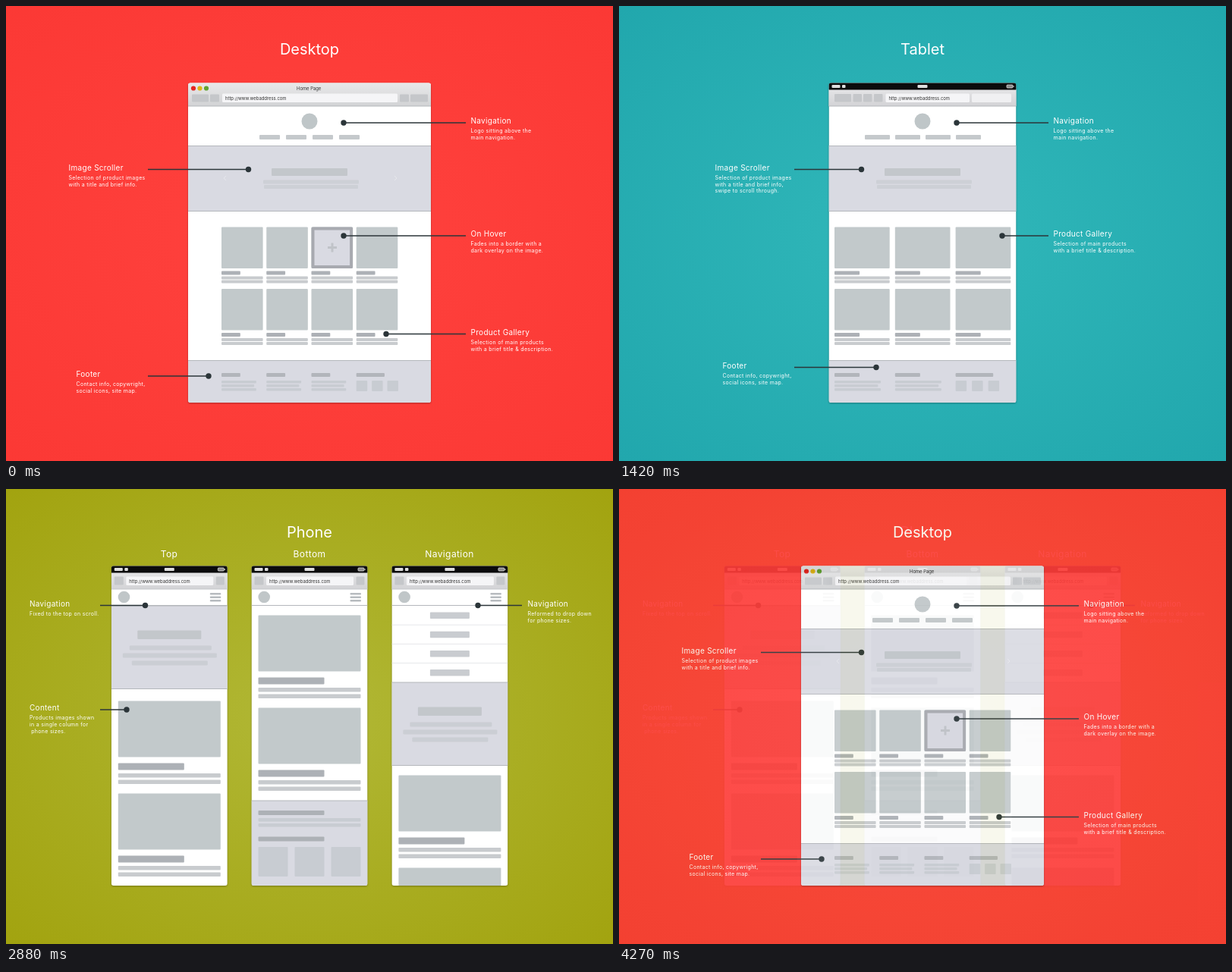
An HTML page that plays this animation: 800x600 px, repeating every 4.3 s.

```html
<!DOCTYPE html>
<html lang="en">
<head>
<meta charset="utf-8">
<title>Responsive wireframes</title>
<style>
  html, body { margin: 0; width: 100%; height: 100%; overflow: hidden; }
  svg { display: block; width: 800px; height: 600px; }
  text { font-family: Inter, "Open Sans", sans-serif; fill: #fff; white-space: pre; }
  .title { font-size: 20px; text-anchor: middle; }
  .sub { font-size: 12px; letter-spacing: .4px; text-anchor: middle; }
  .label { font-size: 10px; letter-spacing: .3px; }
  .body { font-size: 7px; letter-spacing: .3px; }
  .chrome { font-size: 5.9px; fill: #333; }
  .window { filter: drop-shadow(0 1px 1px rgba(0, 0, 0, .3)); }
</style>
</head>
<body>
<svg id="stage" viewBox="0 0 800 600"></svg>
<script>
const LOOP = 4300, STEP = 30, STEPS = 13;
const TILE = '#c2c9cb', CAPTION = '#adb1b6', LINE = '#c8cbce', PANEL = '#d9dae2',
      SOFT = '#c8ccd2', BUTTON = '#c5c7ca', EDGE = '#b4b7bc', INK = '#2b3539';

const range = n => [...Array(n).keys()];
const each = (n, fn) => range(n).map(fn).join('');
const rect = (x, y, w, h, fill, r = 0) =>
  `<rect x="${x}" y="${y}" width="${w}" height="${h}" rx="${r}" fill="${fill}"/>`;
const bar = (x, y, w, h, fill) => rect(x, y, w, h, fill, 1);
const circle = (x, y, r, fill) => `<circle cx="${x}" cy="${y}" r="${r}" fill="${fill}"/>`;
const text = (cls, x, y, str) =>
  `<text class="${cls}" x="${x}" y="${y}">${str.replace('&', '&amp;')}</text>`;
const stroke = (d, color, w) =>
  `<path d="${d}" fill="none" stroke="${color}" stroke-width="${w}"/>`;

// Rounded window that clips its content
let windows = 0;
function frame(x, w, content) {
  const id = 'w' + windows++;
  return `<clipPath id="${id}">${rect(x, 101.5, w, 421.5, '#000', 3)}</clipPath>
    <g class="window"><g clip-path="url(#${id})">${rect(x, 101, w, 423, '#fff')}${content}</g></g>`;
}

const panel = (x, y, w, h) =>
  rect(x, y, w, h, PANEL) + rect(x, y - .5, w, 1, EDGE);

function note(x, y, dotX, endX, label, ...lines) {
  return stroke(`M${dotX} ${y}H${endX}`, INK, 1.6) + circle(dotX, y, 3.7, INK) +
    text('label', x, y + 1, label) +
    lines.map((s, i) => text('body', x, y + 13.3 + i * 8.8, s)).join('');
}

function statusBar(x, w) {
  const right = x + w;
  return rect(x, 101, w, 9.5, '#0b0b0c') +
    bar(x + 4, 104, 11, 4, '#ddd') + bar(x + 17.5, 104, 4.5, 4, '#ddd') +
    bar(x + w / 2 - 6.5, 104, 13, 4, '#ddd') +
    `<rect x="${right - 12.5}" y="104" width="8" height="4" rx="1" fill="#888" stroke="#ddd" stroke-width=".8"/>` +
    rect(right - 4, 105.2, 1, 1.8, '#ddd');
}

const address = (x, w) =>
  rect(x, 115.5, w, 11.5, '#f5f5f7', 1.5) + text('chrome', x + 4, 123.6, 'http://www.webaddress.com');

// Shared desktop and tablet page
function page(x, w, cols, tileW, navW, navX, navPitch, iconPitch) {
  const pitch = (232.3 - tileW) / (cols - 1), head = tileW * .455;
  const col = i => 284 + i * pitch;
  const row = y => each(cols, i =>
    bar(col(i), y, tileW, 54.5, TILE) +
    bar(col(i), y + 58, head, 5, CAPTION) +
    bar(col(i), y + 65, tileW, 4, LINE) +
    bar(col(i), y + 70, tileW, 4, LINE));
  return rect(x, 131.5, w, 1, EDGE) + circle(400, 152, 10.5, '#bfc6c8') +
    each(4, i => bar(navX + i * navPitch, 170, navW, 6, '#c5c9cc')) +
    panel(x, 184.5, w, 86) + rect(x, 270, w, 1, EDGE) +
    bar(350, 214, 100, 10, '#c3c7cb') +
    bar(339, 229.5, 126, 5, '#cdd0d6') + bar(340, 236, 124, 5, '#cdd0d6') +
    row(291.5) + row(373) +
    panel(x, 467.5, w, 56) +
    each(cols, i => bar(col(i), 484, i < cols - 1 ? head : head * 1.5, 5, '#b2b5bb')) +
    each(cols - 1, i => each(3, j =>
      bar(col(i), 494 + j * 5, tileW * (j == 1 ? .79 : .84), 3.5, SOFT))) +
    each(3, i => bar(col(cols - 1) + i * iconPitch, 494, 14.5, 14, SOFT));
}

function desktop() {
  const buttons = [[245, 22], [269, 12], [519, 12], [533, 23]];
  const chrome = rect(240, 101, 320, 31, 'url(#chrome)') +
    ['#e52620', '#e0b414', '#62a331'].map((c, i) => circle(247 + i * 8.5, 108.5, 3.1, c)).join('') +
    text('chrome', 383, 110.8, 'Home Page') +
    buttons.map(([x, w]) => bar(x, 116.5, w, 10, BUTTON)).join('') + address(285, 231);
  const hover = rect(402.5, 291.5, 54.6, 54.5, '#a8aab0', 2) +
    rect(406.5, 295.5, 46.6, 46.5, PANEL) + stroke('M424 318.5h12M430 312.5v12', '#c0c3c8', 3);
  const arrows = stroke('M290 224l-3 3 3 3M512 224l3 3-3 3', '#e6e7ec', 1);
  return text('title', 400, 64, 'Desktop') +
    frame(240, 320, chrome + page(240, 320, 4, 54.6, 27, 334, 35, 20.4) + arrows + hover) +
    note(612.5, 154, 445, 606, 'Navigation', 'Logo sitting above the', 'main navigation.') +
    note(82.5, 215.5, 319.5, 187, 'Image Scroller', 'Selection of product images', 'with a title and brief info.') +
    note(612.5, 303, 445, 606, 'On Hover', 'Fades into a border with a', 'dark overlay on the image.') +
    note(612.5, 432.5, 501, 606, 'Product Gallery', 'Selection of main products', 'with a brief title & description.') +
    note(92.5, 488, 267, 187, 'Footer', 'Contact info, copywright,', 'social icons, site map.');
}

function tablet() {
  const buttons = [[284, 22], [308.5, 11.5], [322, 11.5], [336, 11.5]];
  const chrome = rect(276, 110, 248, 22, 'url(#toolbar)') + statusBar(276.5, 247) +
    statusBar(280, 240).replace(/^<rect[^>]*>.*/, '') +
    buttons.map(([x, w]) => bar(x, 116, w, 10.5, BUTTON)).join('') +
    address(351.5, 110.5) + rect(465, 115.5, 52, 11.5, '#f0f0f2', 1.5);
  return text('title', 400, 64, 'Tablet') +
    frame(276.5, 247, chrome + page(276.5, 247, 3, 72.7, 33, 324, 40, 21.5)) +
    note(572.5, 154, 445, 566, 'Navigation', 'Logo sitting above the', 'main navigation.') +
    note(126.5, 215.5, 319.5, 231, 'Image Scroller', 'Selection of product images', 'with a title and brief info,', 'swipe to scroll through.') +
    note(572.5, 303, 505, 566, 'Product Gallery', 'Selection of main products', 'with a brief title & description.') +
    note(136.5, 476.5, 339, 231, 'Footer', 'Contact info, copywright,', 'social icons, site map.');
}

// Phone parts use x measured from the window's left edge
const product = y => bar(9, y, 135, 74, TILE) + bar(9, y + 82, 87, 9, CAPTION) +
  bar(9, y + 95.5, 135, 5.5, LINE) + bar(9, y + 104, 135, 5.5, LINE);

const hero = y => panel(0, y, 153, 109.5) + rect(0, y + 109, 153, 1, EDGE) +
  bar(34.5, y + 32.5, 84, 11.5, '#c3c7cb') +
  [[24, 108], [15, 124], [27, 100]].map(([x, w], i) =>
    bar(x, y + 52.5 + i * 10, w, 6, '#cbced4')).join('');

function phone(x, content) {
  const chrome = rect(0, 110, 153, 22, 'url(#toolbar)') + statusBar(0, 153) +
    bar(4, 115.5, 12, 11, BUTTON) + bar(138, 115.5, 11, 11, BUTTON) + address(19.5, 115) +
    rect(0, 131.5, 153, 1, '#c6c8cc') + circle(16.7, 142.5, 7.8, '#c0c6c8') +
    each(3, i => bar(130, 137 + i * 4.5, 14.5, 2.4, '#b7bbbf')) +
    rect(0, 153, 153, 1, EDGE);
  return `<g transform="translate(${x})">${frame(0, 153, chrome + content)}</g>`;
}

function phones() {
  const top = hero(154) + product(279.5) + product(401.5);
  const bottom = product(166.5) + product(288.5) + panel(0, 411, 153, 113) +
    bar(9, 424, 87, 6, CAPTION) + bar(9, 434, 135, 4.5, SOFT) + bar(9, 441, 135, 4.5, SOFT) +
    bar(9, 458.5, 87, 6, CAPTION) + each(3, i => bar(9 + i * 48, 472, 39, 39, SOFT));
  const menu = each(4, i => bar(50.5, 162.5 + i * 25.2, 52, 8.5, '#c9ccd0')) +
    each(3, i => rect(0, 178.7 + i * 25.2, 153, 1, '#e6e7ea')) +
    hero(255) + product(377.5) + product(499.5);
  return text('title', 400, 64, 'Phone') +
    text('sub', 215, 89.5, 'Top') + text('sub', 400, 89.5, 'Bottom') + text('sub', 584.5, 89.5, 'Navigation') +
    phone(138.8, top) + phone(323.5, bottom) + phone(508.4, menu) +
    note(31, 153.5, 183.5, 124, 'Navigation', 'Fixed to the top on scroll.') +
    note(31, 291, 159, 124, 'Content', 'Products images shown', 'in a single column for', ' phone sizes.') +
    note(687.5, 153.5, 622, 680, 'Navigation', 'Reformed to drop down', 'for phone sizes.');
}

const shade = (id, from, to) =>
  `<linearGradient id="${id}" x2="0" y2="1"><stop stop-color="${from}"/><stop offset="1" stop-color="${to}"/></linearGradient>`;
const scene = (id, inner, outer, content) =>
  `<radialGradient id="${id}Bg" r=".75"><stop stop-color="${inner}"/><stop offset="1" stop-color="${outer}"/></radialGradient>
   <g id="${id}">${rect(0, 0, 800, 600, `url(#${id}Bg)`)}${content}</g>`;

const stage = document.getElementById('stage');
stage.innerHTML = shade('chrome', '#e9e9ea', '#d2d3d5') + shade('toolbar', '#e4e4e6', '#d3d3d6') +
  scene('desktop', '#ff423e', '#fb3834', desktop()) +
  scene('tablet', '#31b8ba', '#20a6ac', tablet()) +
  scene('phone', '#b1b836', '#a1a20d', phones());

const tabletLayer = stage.querySelector('#tablet');
const phoneLayer = stage.querySelector('#phone');

const fade = (t, start) =>
  Math.min(1, Math.max(0, (Math.floor((t - start) / STEP) + 1) / STEPS));

function draw(now) {
  const t = now % LOOP;
  tabletLayer.setAttribute('opacity', t < 3000 ? fade(t, 1060) : 0);
  phoneLayer.setAttribute('opacity', fade(t, 2520) - fade(t, 3940));
  requestAnimationFrame(draw);
}
draw(0);
</script>
</body>
</html>
```
